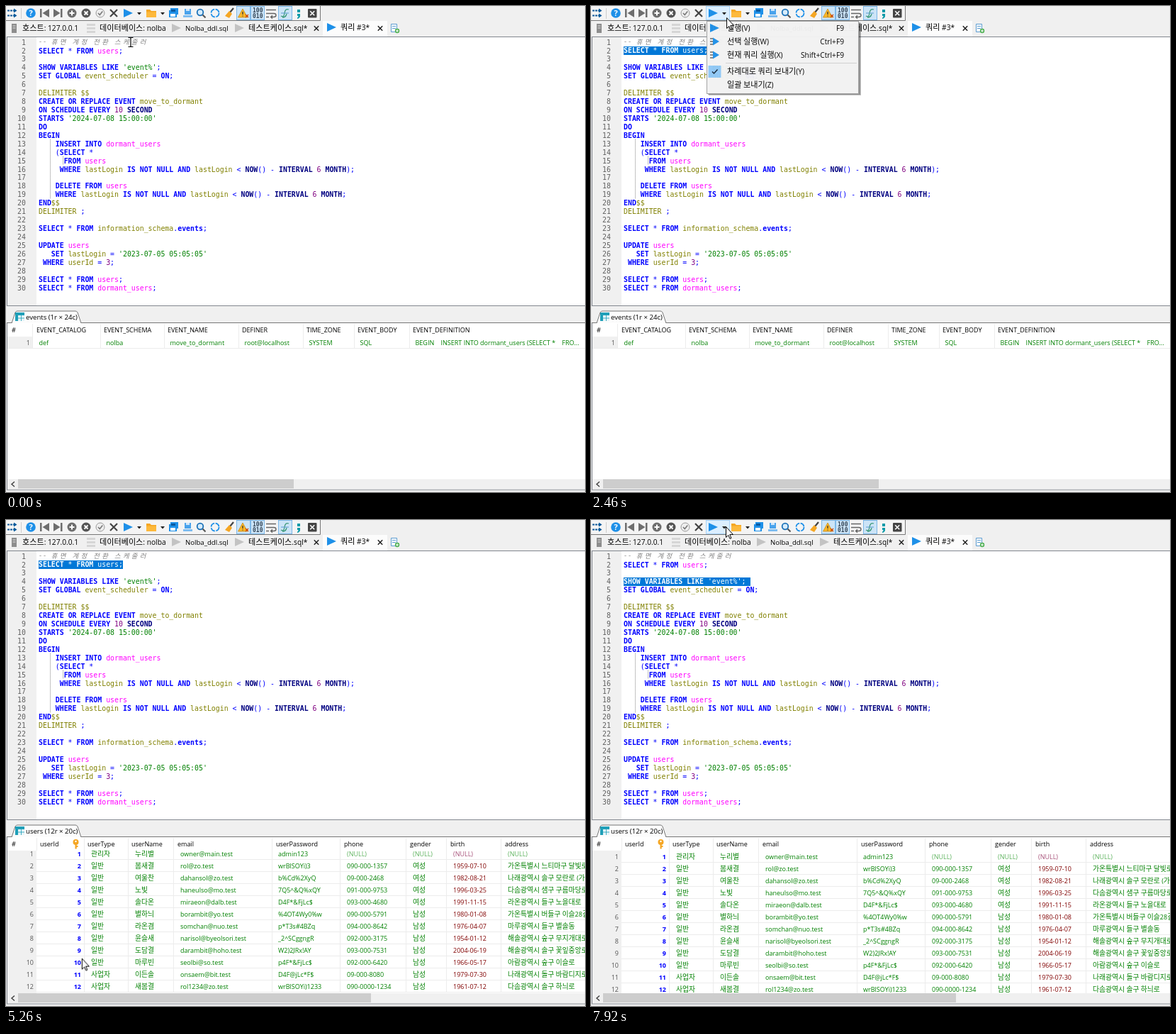
Recreate the animation shown at these times as an HTML page. Size 817 by 685 pixels, loop 7.99 s.

```html
<!DOCTYPE html>
<html lang="ko">
<head>
<meta charset="utf-8">
<title>SQL query session</title>
<style>
html, body { margin: 0; width: 100%; height: 100%; overflow: hidden; background: #f0f0f0; }
svg.layer { position: absolute; left: 0; top: 0; }
text { white-space: pre; font: 9px "Open Sans", "Noto Sans CJK KR", "Noto Sans CJK JP", sans-serif; fill: #000; }
.h { font-size: 1.09em; font-family: "Noto Sans CJK KR", "Noto Sans CJK JP", sans-serif; }
text.ui { font-size: 10.2px; }
text.tab { font-size: 9.6px; }
text.cell { fill: #008000; }
text.null { fill: #5fb35f; }
text.date { fill: #800000; }
text.nodate { fill: #a8527a; }
text.id { fill: #00f; font-weight: 700; }
text.num { fill: #555; }
.end { text-anchor: end; }
text.code, .sel { font: 9.88px "DejaVu Sans Mono", monospace; }
text.code { fill: #00f; }
text.code.line { fill: #606060; }
text.note { font: italic 9.4px "Noto Sans CJK KR", "Noto Sans CJK JP", sans-serif; fill: #808080; }
.kw { font-weight: 700; }
.fn { font-weight: 700; fill: #000080; }
.tbl { fill: #f0f; }
.var { fill: #808000; }
.str { fill: #008000; }
.int { fill: #800080; }
.sel { position: absolute; left: 46px; width: 0; height: 12px; line-height: 12px; overflow: hidden;
  white-space: pre; background: #0078d7; color: #fff; }
#sel1 { top: 57px; }
#sel2 { top: 81px; }
</style>
</head>
<body>
<svg class="layer" id="base" width="817" height="685"></svg>
<div class="sel" id="sel1"><b>SELECT</b> * <b>FROM</b> users;</div>
<div class="sel" id="sel2"><b>SHOW VARIABLES LIKE</b> 'event%'; </div>
<svg class="layer" id="over" width="817" height="685"></svg>
<script>
const LOOP = 7990, CW = 5.947, LINE = 11.93;

// ---- drawing helpers ----
const esc = s => s.replace(/&/g, '&amp;').replace(/</g, '&lt;');
const hangul = s => esc(s).replace(/[가-힣]+/g, '<tspan class="h">$&</tspan>');
const text = (x, mid, s, cls = 'cell') => `<text x="${x}" y="${mid + 3.5}" class="${cls}">${hangul(s)}</text>`;
const rect = (x, y, w, h, fill, more = '') => `<rect x="${x}" y="${y}" width="${w}" height="${h}" fill="${fill}" ${more}/>`;
const path = (d, fill, stroke = 'none', w = 1) => `<path d="${d}" fill="${fill}" stroke="${stroke}" stroke-width="${w}"/>`;
const line = (d, stroke, w = 1) => path(d, 'none', stroke, w);
const disc = (x, y, r, fill, more = '') => `<circle cx="${x}" cy="${y}" r="${r}" fill="${fill}" ${more}/>`;
const play = (x, y, fill) => path(`M${x} ${y - 6}l13 6-13 6z`, fill);
const drop = (x, fill) => path(`M${x - 3} 9h6l-3 3.5z`, fill);
const cross = (x, y, r, c, w) => line(`M${x - r} ${y - r}l${2 * r} ${2 * r}m0 ${-2 * r}l${-2 * r} ${2 * r}`, c, w);
const group = (id, body) => `<g id="${id}">${body}</g>`;

// ---- toolbar ----
const pressed = x => rect(x + .5, .5, 19, 19, '#cce4f7', 'stroke="#7db8e8"');
const GRAY = '#6e6e6e', BLUE = '#1e90e8';
const toolbar = () => rect(0, 0, 443, 20, '#f4f4f4') + line('M0 20.5H443.5V0', '#777') +
  line('M2 6.5h3m1 0h3m1 0h4M2 13.5h3m1 0h3m1 0h4', '#0a5c9c', 2) + path('M11 3.5l4.5 3-4.5 3zM11 10.5l4.5 3-4.5 3z', '#0a5c9c') +
  line('M21.5 3V18', '#ccc') +
  disc(35, 10, 6.8, BLUE) + '<text x="35" y="14" text-anchor="middle" style="font-weight:700;font-size:11px;fill:#fff">?</text>' +
  path('M48 4h2.5v12H48zM61 4v12l-9.5-6zM79.5 4H77v12h2.5zM67 4v12l9.5-6z', GRAY) +
  disc(93, 10, 6.5, GRAY) + line('M93 6.5v7M89.5 10h7', '#fff', 2) +
  disc(113, 10, 6.5, '#555') + cross(113, 10, 2.5, '#fff', 1.8) +
  disc(133, 10, 6, '#eee', 'stroke="#999"') + line('M130 10l2.3 2.5 4-5', '#777', 1.5) +
  cross(152, 10, 5, '#444', 2.2) +
  group('hot', rect(162.5, .5, 33, 19, '#dcefff', 'stroke="#a8d4f8"')) +
  group('ready', play(166, 10, BLUE) + drop(188, '#222')) +
  group('busy', play(166, 10, '#777') + drop(188, '#999')) +
  path('M198 5h5l2 2h7v9h-14z', '#f5a623') + path('M198 8.5h14v7.5h-14z', '#fdb93c') + drop(221, '#222') +
  path('M232 3h11v9h-2v4h-11V6h2z', BLUE) + rect(233, 5, 6, 3, '#0b5aa0') + rect(232, 11, 7, 4, '#fff') +
  rect(252, 4, 9, 8, '#4aa3ec') + rect(250, 13, 13, 3, '#7fbdf0') + rect(254, 4, 5, 3, '#cfe6fa') +
  disc(274, 9, 4.3, '#d6ecfc', 'stroke="#1c72b8" stroke-width="1.8"') + line('M277.5 12.5l4 4', '#555', 2.2) +
  disc(295, 10, 5.5, 'none', `stroke="${BLUE}" stroke-width="1.8" stroke-dasharray="7 1.64"`) +
  line('M321 3l-5 6', '#444', 2.2) + path('M315 7l4 4-4 6-6-3z', '#f5a623') +
  pressed(325) + path('M334 4l6.5 12h-13z', '#fbb829', '#c98a10', .8) + line('M334 8v4m0 1.5v1', '#333', 1.3) + cross(340, 14, 2, '#c40', 1.2) +
  pressed(345) + ['100', '010'].map((s, i) => `<text class="code" x="348" y="${9 + i * 8}" style="font-size:8px;font-weight:700;fill:#345">${s}</text>`).join('') +
  line('M367 5.5h14M367 10.5h11q3 0 3 2.5t-3 2.5h-4M367 15.5h4', '#666', 1.4) + path('M376 12.5v6l-3.5-3z', '#666') +
  pressed(384) + line('M388 14q4 3 5-4t6-5M390 16q5 0 6-5', '#3d9a7a', 1.3) + line('M388 10h11', '#5b9bd0') +
  path('M411 5h4v4h-4zM411 11h4v3q0 3-4 4v-1.5q1.5-.5 1.5-2.5H411z', '#0a9aa8') +
  rect(426, 4, 12.5, 12.5, '#444', 'rx="1"') + cross(432.2, 10.2, 3, '#fff', 1.6);

// ---- document tabs ----
const tabs = () => group('tabHot', rect(113, 22, 116, 20, '#d8e8f8')) +
  rect(447, 21, 91, 22, '#fcfcfc') +
  rect(8, 25, 7, 13, '#8d8d8d') + line('M9.5 28h4m-4 3h4', '#ddd') + text(23, 31, '호스트: 127.0.0.1', 'ui') +
  [25, 30, 35].map(y => rect(114, y, 12, 3, '#d6d6d6')).join('') + text(132, 31, '데이터베이스: nolba', 'ui') +
  play(234, 31, '#c3c3c3') + text(253, 31, 'Nolba_ddl.sql', 'tab') +
  play(323, 31, '#c3c3c3') + text(342, 31, '테스트케이스.sql*', 'ui') + cross(438, 31.5, 3.2, '#222', 1.5) +
  play(453, 30, BLUE) + text(472, 30, '쿼리 #3*', 'ui') + cross(528, 31.5, 3.2, '#222', 1.5) +
  path('M543.5 25.5h8v11h-8z', '#fff', '#5b9bd0') + line('M545 28.5h5m-5 3h5', '#5b9bd0') +
  disc(552, 35, 3.2, '#4caf50') + line('M552 33v4m-2-2h4', '#fff');

// ---- editor ----
const sql = `
SELECT * FROM users;

SHOW VARIABLES LIKE 'event%';
SET GLOBAL event_scheduler = ON;

DELIMITER $$
CREATE OR REPLACE EVENT move_to_dormant
ON SCHEDULE EVERY 10 SECOND
STARTS '2024-07-08 15:00:00'
DO
BEGIN
    INSERT INTO dormant_users
    (SELECT *
      FROM users
     WHERE lastLogin IS NOT NULL AND lastLogin < NOW() - INTERVAL 6 MONTH);

    DELETE FROM users
    WHERE lastLogin IS NOT NULL AND lastLogin < NOW() - INTERVAL 6 MONTH;
END$$
DELIMITER ;

SELECT * FROM information_schema.events;

UPDATE users
   SET lastLogin = '2023-07-05 05:05:05'
 WHERE userId = 3;

SELECT * FROM users;
SELECT * FROM dormant_users;`.split('\n');
const kinds = ['str', 'tbl', 'fn', 'int', 'var', 'kw', 'op'];
const token = /('[^']*')|\b(users|dormant_users)\b|\b(NOW|INTERVAL|MONTH|SECOND)\b|\b(\d+)\b|(\$\$|DELIMITER|\b(?!events\b)[a-z]\w*)|\b([A-Z]+|events)\b|(<)/g;
const paint = s => s.replace(token, (m, ...g) =>
  `<tspan class="${kinds[g.findIndex(v => v !== undefined)]}">${esc(m)}</tspan>`);
// Hangul takes two columns of the grid
const note = (s, y) => {
  let col = 0;
  const xs = [...s].map(c => { const x = 46 + col * CW; col += c > '~' ? 2 : 1; return x.toFixed(1); });
  return `<text class="note" x="${xs.join(' ')}" y="${y}">${s}</text>`;
};
const editor = () => rect(1.5, 43.5, 830, 379, '#fff', 'stroke="#82878f"') + rect(2, 44, 41, 378, '#f0f0f0') +
  note('-- 휴면 계정 전환 스케줄러', 54) +
  sql.map((s, i) => {
    const y = Math.round(54.6 + i * LINE);
    return `<text class="code line end" x="28" y="${y}">${i + 1}</text><text class="code" x="46" y="${y}">${paint(s)}</text>`;
  }).join('') +
  '<path d="M62.5 188V272M80.5 212V224" stroke="#888" stroke-dasharray="1 1"/>';

// ---- result grid ----
const EDGE = '#ececec';
const vlines = (xs, y, h) => line(xs.map(x => `M${x + .5} ${y}v${h}`).join(''), EDGE);
const eventCols = [[43, 'EVENT_CATALOG', 'def'], [138, 'EVENT_SCHEMA', 'nolba'], [228, 'EVENT_NAME', 'move_to_dormant'],
  [333, 'DEFINER', 'root@localhost'], [424, 'TIME_ZONE', 'SYSTEM'], [496, 'EVENT_BODY', 'SQL'],
  [574, 'EVENT_DEFINITION', 'BEGIN    INSERT INTO dormant_users (SELECT *    FRO...']];
const events = () => vlines([37, 133, 223, 328, 419, 491, 569], 448, 34) + rect(2, 466, 35, 16, '#f0f0f0') +
  line('M2 482.5H817', EDGE) + text(8, 456, '#', '') + text(34, 474, '1', 'num end') +
  eventCols.map(([x, head, val]) => text(x, 456, head, '') + text(x + 3.5, 474, val)).join('');

const userEdges = [110, 172, 236, 375, 471, 564, 621, 698];
const userHead = [[8, '#'], [48, 'userId'], [115, 'userType'], [177, 'userName'], [242, 'email'], [381, 'userPassword'],
  [477, 'phone'], [570, 'gender'], [627, 'birth'], [704, 'address']];
const userX = [120, 182, 246, 384, 481, 574, 631, 708];
const users = `관리자|누리별|owner@main.test|admin123|(NULL)|(NULL)|(NULL)|(NULL)
일반|봄새결|rol@zo.test|wrBlSOYi)3|090-000-1357|여성|1959-07-10|가온특별시 느티마구 달빛로
일반|여울찬|dahansol@zo.test|b%Cd%2XyQ|09-000-2468|여성|1982-08-21|나래광역시 솔구 모란로 (가나)
일반|노빛|haneulso@mo.test|7Q5^&Q%xQY|091-000-9753|여성|1996-03-25|다솜광역시 샘구 구름마당로
일반|솔다온|miraeon@dalb.test|D4F*&FjLc$|093-000-4680|여성|1991-11-15|라온광역시 들구 노을대로
일반|별하늬|borambit@yo.test|%4OT4Wy0%w|090-000-5791|남성|1980-01-08|가온특별시 버들구 이슬28길
일반|라온겸|somchan@nuo.test|p*T3s#4BZq|094-000-8642|남성|1976-04-07|마루광역시 들구 별솔동
일반|윤슬새|narisol@byeolsori.test|_2^SCggngR|092-000-3175|남성|1954-01-12|해솔광역시 숲구 무지개대로
일반|도담결|darambit@hoho.test|W2)2JRx!AY|093-000-7531|남성|2004-06-19|해솔광역시 솔구 꽃잎중앙로
일반|마루빈|seolbi@so.test|p4F*&FjLc$|092-000-6420|남성|1966-05-17|아람광역시 숲구 이슬로
사업자|이든솔|onsaem@bit.test|D4F@jLc*F$|09-000-8080|남성|1979-07-30|나래광역시 돌구 바람디지로
사업자|새봄결|rol1234@zo.test|wrBlSOYi)1233|090-0000-1234|남성|1961-07-12|다솜광역시 솔구 하늬로`.split('\n').map(r => r.split('|'));
const cellClass = (s, col) => s === '(NULL)' ? (col === 6 ? 'nodate' : 'null') : col === 6 ? 'date' : 'cell';
const userRow = (r, i) => {
  const y = 8 + i * 17;
  return vlines(userEdges, y - 8, 17) + line(`M43 ${y + 8.5}H817`, EDGE) + text(106, y, `${i + 1}`, 'id end') +
    r.map((s, col) => text(userX[col], y, s, cellClass(s, col))).join('');
};
const userGrid = () => '<svg x="0" y="466" width="817" height="201">' + group('scroll',
  rect(2, 0, 41, 206, '#f0f0f0') + users.map((r, i) => text(39, 8 + i * 17, `${i + 1}`, 'num end')).join('') +
  users.slice(0, 4).map(userRow).join('') +
  group('late', users.slice(4).map((r, i) => userRow(r, i + 4)).join(''))) + '</svg>';
const userHeader = () => vlines([43, ...userEdges], 448, 18) +
  userHead.map(([x, s]) => text(x, 456, s, '')).join('') +
  disc(98.5, 454, 4, '#f5a623') + disc(98.5, 453, 1.2, '#fff') + rect(97.5, 456, 2.2, 7.5, '#f5a623') + rect(99, 459, 2.5, 2, '#f5a623');
const results = () => rect(1.5, 446.5, 830, 235.5, '#fff', 'stroke="#82878f"') +
  path('M8 447l5-15q1-2 3-2h82q2 0 3 2l5 15', '#fcfcfc', '#777') + line('M1 446.5h7m98 0h711', '#777') +
  rect(13, 432, 13, 12, '#1f9fb8') + rect(17, 436, 9, 8, '#e6f4f8') + line('M21.5 436v8M17 440h9', '#1f9fb8', .8) +
  group('tabOld', text(28, 438, 'events (1r × 24c)', 'tab')) + group('tabNew', text(28, 438, 'users (12r × 20c)', 'tab')) +
  group('old', events()) + group('fresh', userGrid()) + group('head', userHeader()) +
  rect(2, 667, 815, 14, '#f0f0f0') + line('M12 670.5l-4 3.5 4 3.5', '#444', 1.5) +
  group('barOld', rect(17, 667, 389, 13, '#cdcdcd')) + group('barNew', rect(17, 667, 498, 13, '#cdcdcd'));

// ---- menu and pointer ----
const entry = (y, s, key = '') => text(192, y, s, 'ui') + text(357, y, key, 'ui end');
const lined = y => line(`M168 ${y - 4}h4m-4 4h4m-4 4h4`, '#666', 1.5) + path(`M172 ${y - 5.5}l9 5.5-9 5.5z`, BLUE);
const picked = y => rect(165, y - 8, 210, 17, '#91c9f7');
const second = () => lined(50) + entry(50, '선택 실행(W)', 'Ctrl+F9');
const menu = () => rect(166, 24, 215, 102, '#000', 'opacity=".25"') + rect(165, 23, 215, 102, '#000', 'opacity=".25"') +
  rect(163.5, 21.5, 214, 102, '#f2f2f2', 'stroke="#a0a0a0"') +
  group('pick1', picked(31)) + group('pick2', picked(50)) +
  play(168, 31, BLUE) + entry(31, '실행(V)', 'F9') + second() +
  lined(69) + entry(69, '현재 쿼리 실행(X)', 'Shift+Ctrl+F9') + line('M190 80.5H375', '#d0d0d0') +
  rect(165.5, 84, 18, 17, '#90c8f6') + line('M171 92.5l2.5 2.5 5-5.5', '#123', 1.4) +
  entry(92, '차례대로 쿼리 보내기(Y)') + entry(111, '일괄 보내기(Z)');
const pointer = () => group('beam', line('M-3.5-6.5h2.5q1 0 1 1q0-1 1-1h2.5M0-6V6M-3.5 6.5h2.5q1 0 1-1q0 1 1 1h2.5', '#000', 1.2)) +
  group('arrow', path('M.5.5V15.5L3.8 12.4 6 17.3 8 16.5 5.8 11.5H10.5Z', '#fff', '#000'));

document.getElementById('base').innerHTML = rect(0, 0, 817, 685, '#f0f0f0') + toolbar() + tabs() + editor() + results();
document.getElementById('over').innerHTML = group('caret', rect(165, 57, 1, 12, '#000')) +
  group('trace', line('M1 128.5H170.5V57', '#777')) + group('menu', menu()) +
  group('ghost', picked(50) + second()) + group('pointer', pointer());

// ---- timing, in ms ----
let css = '';
const track = (id, keys, ease = 'linear') => {
  const rules = [...keys, [LOOP, keys[keys.length - 1][1]]].map(([t, d]) => `${(t / LOOP * 100).toFixed(3)}%{${d}}`);
  css += `@keyframes ${id}{${rules.join('')}}#${id}{animation:${id} ${LOOP}ms ${ease} infinite}`;
};
const show = (id, ...spans) => track(id, [[0, 'opacity:0'], ...spans.flatMap(([a, b]) =>
  [[a, 'opacity:1'], ...(b < LOOP ? [[b, 'opacity:0']] : [])])], 'step-end');

const RUN = 3120, LOADED = 3350;
show('hot', [2060, RUN], [7890, LOOP]);
show('ready', [0, RUN], [LOADED, LOOP]);
show('busy', [RUN, LOADED]);
show('tabHot', [1740, 2000]);
show('tabOld', [0, LOADED]);
show('tabNew', [LOADED, LOOP]);
show('old', [0, RUN]);
show('barOld', [0, RUN]);
show('barNew', [RUN, LOOP]);
show('fresh', [RUN, LOOP]);
show('late', [LOADED, LOOP]);
show('head', [LOADED, LOOP]);
show('trace', [RUN, LOADED]);
show('pick1', [2600, 3060]);
show('pick2', [3060, RUN]);
show('caret', [1440, 2350], [3400, 3800], [4150, 4750], [5280, 5620], [5880, 6460]);
show('beam', [0, 1715], [6230, 7740]);
show('arrow', [1715, 6230], [7740, LOOP]);
track('menu', [[0, 'opacity:0'], [2330, 'opacity:0'], [2460, 'opacity:.97'], [2530, 'opacity:1'], [RUN - 1, 'opacity:1'], [RUN, 'opacity:0']]);
track('ghost', [[0, 'opacity:0'], [RUN - 1, 'opacity:0'], [RUN, 'opacity:.6'], [3730, 'opacity:.6'], [3780, 'opacity:0']]);
track('scroll', [[0, 'transform:none'], [4930, 'transform:translateY(-4px)'], [5670, 'transform:none']], 'step-end');
track('sel1', [[0, 'width:0'], [1070, 'width:0;animation-timing-function:steps(20)'], [1440, 'width:119px'], [6980, 'width:119px'], [6981, 'width:0']]);
track('sel2', [[0, 'width:0'], [7060, 'width:0'], [7130, 'width:12px;animation-timing-function:steps(28)'], [7255, 'width:179px']]);
track('pointer', [[0, 176, 51], [70, 176, 51], [670, 49, 66], [870, 49, 66], [1020, 40, 63], [1460, 172, 68], [1600, 172, 68],
  [1800, 183, 26], [2190, 190, 12], [2330, 190, 12], [2460, 191, 16], [2660, 193, 31], [2850, 193, 31], [2920, 203, 41],
  [3730, 203, 41], [3990, 248, 510], [4130, 248, 510], [4260, 217, 429], [4460, 82, 476], [4730, 82, 476], [5330, 110, 636],
  [5600, 110, 636], [5930, 195, 525], [6330, 150, 125], [6400, 150, 125], [6900, 41, 88], [7060, 46, 86], [7130, 57, 85],
  [7260, 249, 80], [7590, 249, 80], [7800, 236, 30], [7920, 190, 9]].map(([t, x, y]) => [t, `transform:translate(${x}px,${y}px)`]));
document.head.appendChild(document.createElement('style')).textContent = css;
</script>
</body>
</html>
```
